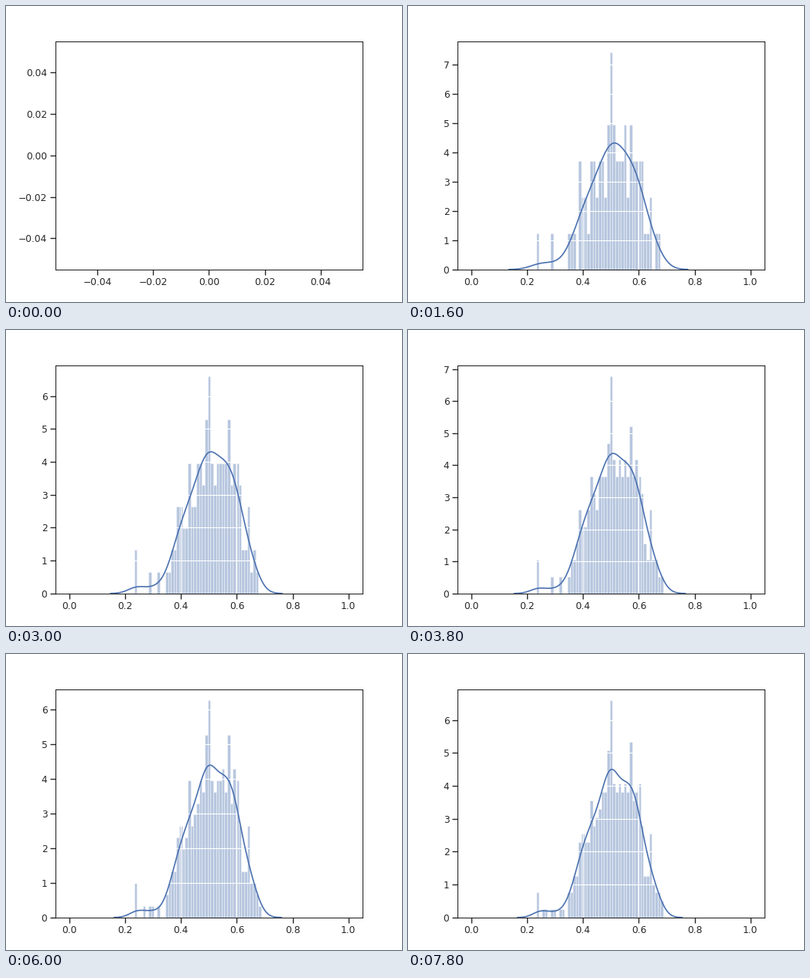
Write a matplotlib script that moves like this. It is 512 px wide and 384 px high and loops after 8000 ms.

```python
import numpy as np
import matplotlib.pyplot as plt
from matplotlib.animation import FuncAnimation

BLUE = "#4C72B0"
INK = "0.15"
BINS = np.linspace(0, 1, 100)
PER_FRAME = 10
FRAMES = 40

plt.rcParams.update({
    "font.family": "DejaVu Sans",
    "axes.grid": True,
    "grid.color": "white",
    "grid.linewidth": 1,
    "axes.edgecolor": "black",
    "axes.linewidth": 0.8,
    "xtick.color": INK,
    "ytick.color": INK,
    "xtick.labelsize": 11,
    "ytick.labelsize": 11,
    "xtick.major.size": 6,
    "ytick.major.size": 6,
    "xtick.major.width": 1.25,
    "ytick.major.width": 1.25,
    "lines.solid_capstyle": "round",
})

# Likelihood of each whole percentage: a rough outline with a few spikes.
# The 50 % value is left out here because it has its own growth curve.
percent = np.arange(101)
weight = np.interp(percent,
                   [23, 24, 25, 34, 37, 40, 42, 48, 53, 60, 61, 62, 65, 70],
                   [0, 2, 0.6, 0.7, 5, 10, 9, 16, 16, 15.5, 12, 5.5, 4.5, 0])
weight[[43, 49, 57, 64]] += 5
weight[50] = 0
cumulative = np.cumsum(weight) / weight.sum()

# Golden-ratio steps keep every prefix of the sequence evenly spread.
golden = (np.sqrt(5) - 1) / 2
steps = np.arange(FRAMES * PER_FRAME) * golden % 1
spread = np.searchsorted(cumulative, steps, side="right") / 100


def samples(i):
    middle = round(np.interp(i, [0, 8, 12, 19, 24, 30, 39],
                             [0, 6, 8, 13, 14, 19, 26]))
    return np.append(spread[:i * PER_FRAME - middle], np.full(middle, 0.5))


def density(data):
    """Gaussian kernel estimate with Scott's bandwidth, cut at three widths."""
    width = data.std(ddof=1) * len(data) ** -0.2
    x = np.linspace(data.min() - 3 * width, data.max() + 3 * width, 100)
    z = (x[:, None] - data) / width
    return x, np.exp(-z * z / 2).mean(axis=1) / (width * np.sqrt(2 * np.pi))


fig, ax = plt.subplots(figsize=(6.4, 4.8), dpi=80)


def draw(i):
    ax.clear()
    if i == 0:
        ax.set(xlim=(-0.055, 0.055), ylim=(-0.055, 0.055))
        return
    data = samples(i)
    heights, *_ = ax.hist(data, BINS, density=True, color=BLUE, alpha=0.4,
                          edgecolor="white", linewidth=1)
    x, y = density(data)
    ax.plot(x, y, color=BLUE, lw=1.5)
    ax.set(xlim=(-0.05, 1.05), ylim=(0, 1.05 * max(heights.max(), y.max())))


anim = FuncAnimation(fig, draw, frames=FRAMES, init_func=lambda: draw(0),
                     interval=200, repeat=True, repeat_delay=0)
plt.show()
```
